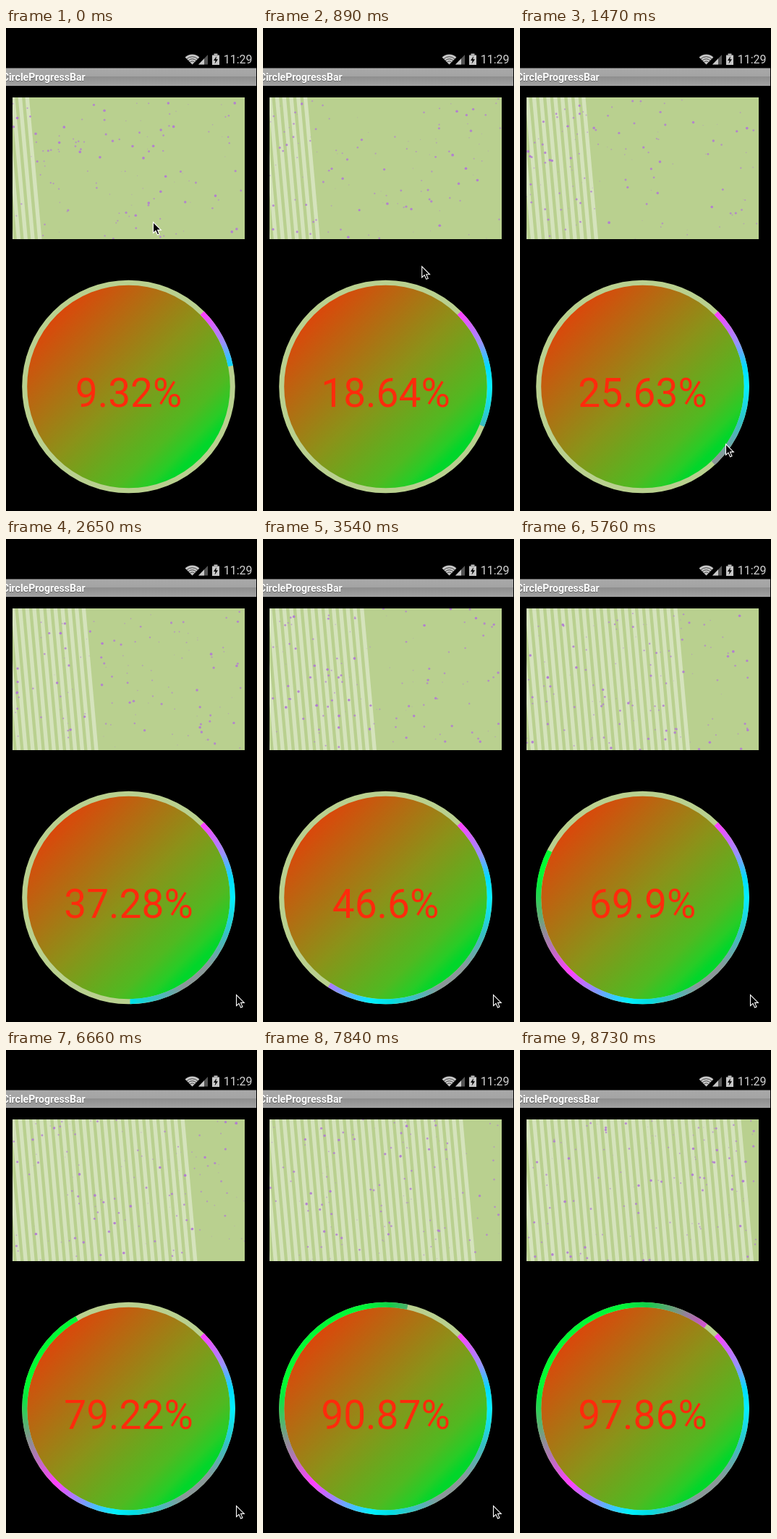
These frames come from a looping animation (347x668 px, 9.09 s). An HTML page with a canvas:

```html
<!DOCTYPE html>
<html lang="en">
<head>
<meta charset="utf-8">
<title>Circle progress</title>
<style>
  html, body { margin: 0; width: 100%; height: 100%; overflow: hidden; background: #000; }
  canvas { display: block; width: 347px; height: 668px; }
</style>
</head>
<body>
<canvas id="stage"></canvas>
<script>
const W = 347, H = 668, LOOP = 9090, TICK = 148.1;
const CX = 169.5, CY = 496, R = 147.3, RING = 7;
const PANEL = { x: 9, y: 96, w: 321, h: 196 };
const PALE = '#b9d08f';

// Ticks on which the progress value holds still.
const HOLDS = new Set([2, 5, 8, 11, 14, 17, 20, 22, 25, 28, 31, 34, 37, 40,
  43, 46, 48, 51, 54, 55, 57, 60, 61]);
const STRIPE_KEYS = [[4, 0], [11, 6], [16, 8], [23, 14], [30, 19], [39, 25], [42, 28]];
const POINTER_X = [[5, 203], [10, 284], [13, 318]];
const POINTER_Y = [[5, 268], [10, 575], [13, 630]];
const POINTER_END = 56;

const canvas = document.getElementById('stage');
const ctx = canvas.getContext('2d');
const scale = window.devicePixelRatio || 1;
canvas.width = W * scale;
canvas.height = H * scale;

function lerpKeys(keys, v) {
  if (v <= keys[0][0]) return keys[0][1];
  for (let i = 1; i < keys.length; i++) {
    const [a, va] = keys[i - 1], [b, vb] = keys[i];
    if (v <= b) return va + (vb - va) * (v - a) / (b - a);
  }
  return keys[keys.length - 1][1];
}

function random(seed) {
  let s = seed * 7919 + 17;
  return () => {
    s = (s + 0x6D2B79F5) | 0;
    let t = Math.imul(s ^ (s >>> 15), 1 | s);
    t = (t + Math.imul(t ^ (t >>> 7), 61 | t)) ^ t;
    return ((t ^ (t >>> 14)) >>> 0) / 4294967296;
  };
}

function poly(points) {
  ctx.beginPath();
  for (let i = 0; i < points.length; i += 2) ctx.lineTo(points[i], points[i + 1]);
  ctx.closePath();
}

function label(str, x, y, font, color, align) {
  ctx.font = font + ' Roboto, sans-serif';
  ctx.textAlign = align;
  ctx.fillStyle = color;
  ctx.fillText(str, x, y);
}

function withStops(gradient, stops) {
  for (const [at, color] of stops) gradient.addColorStop(at, color);
  return gradient;
}

const discFill = withStops(ctx.createLinearGradient(29, 355, 310, 637), [
  [0.12, '#e0420a'], [0.5, '#8b9219'], [0.72, '#50b921'], [0.79, '#28cc26'], [0.83, '#02d62a']
]);

const sweep = withStops(ctx.createConicGradient(0, CX, CY), [
  [0, '#00f0ff'], [20, '#35c0c4'], [42, '#8a9899'], [58, '#8a9899'],
  [88, '#00dfe6'], [98, '#00f0ff'], [134, '#ff40ff'], [162, '#8a8f92'],
  [186, '#08e840'], [195, '#00ff30'], [258, '#00f838'], [272, '#10d048'],
  [290, '#7c9486'], [302, '#b862b8'], [315, '#ff40ff'], [335, '#9a90ff'],
  [349, '#00dcff'], [360, '#00f0ff']
].map(([deg, color]) => [deg / 360, color]));

const barFill = withStops(ctx.createLinearGradient(0, 55, 0, 80), [
  [0, '#a9a9a9'], [0.48, '#a3a3a3'], [0.5, '#8f8f8f'], [1, '#a2a2a2']
]);

function drawStatusBar() {
  ctx.fillStyle = '#c8c8c8';
  ctx.beginPath();
  ctx.moveTo(257.5, 50.5);
  ctx.arc(257.5, 50.5, 14, -Math.PI * 0.75, -Math.PI * 0.25);
  ctx.fill();
  ctx.strokeStyle = '#222';
  ctx.lineWidth = 0.8;
  for (const r of [4.5, 7.7, 10.8]) {
    ctx.beginPath();
    ctx.arc(257.5, 50.5, r, -Math.PI * 0.75, -Math.PI * 0.25);
    ctx.stroke();
  }

  ctx.fillStyle = '#555';
  poly([266, 50.5, 279, 50.5, 279, 37]);
  ctx.fill();
  ctx.fillStyle = '#c8c8c8';
  poly([266, 50.5, 274, 50.5, 274, 42.2]);
  ctx.fill();

  ctx.fillRect(285, 37.5, 10, 13.5);
  ctx.fillRect(287.5, 35.5, 5, 2);
  ctx.fillStyle = '#000';
  poly([291, 39, 287, 45, 289.6, 45, 288.6, 49.5, 293, 43.3, 290.3, 43.3]);
  ctx.fill();

  label('11:29', 340.5, 49, '16px', '#d0d0d0', 'right');
}

function drawTitleBar() {
  ctx.fillStyle = barFill;
  ctx.fillRect(0, 55.5, 346, 24.5);
  label('CircleProgressBar', 109.5, 74, 'bold 14px', 'rgba(0,0,0,.35)', 'right');
  label('CircleProgressBar', 109.5, 73, 'bold 14px', '#fff', 'right');
}

function drawPanel(step) {
  const { x, y, w, h } = PANEL;
  ctx.save();
  ctx.beginPath();
  ctx.rect(x, y, w, h);
  ctx.clip();
  ctx.fillStyle = PALE;
  ctx.fillRect(x, y, w, h);

  ctx.fillStyle = 'rgba(255,255,255,.4)';
  const last = Math.round(lerpKeys(STRIPE_KEYS, step));
  for (let i = -4; i <= last; i++) {
    const right = 49.5 + i * 9.77, lean = 17.6, wide = 5.4;
    poly([right - lean - wide, y, right - lean, y, right, y + h, right - wide, y + h]);
    ctx.fill();
  }

  const rnd = random(step);
  for (let i = 0; i < 120; i++) {
    const size = rnd();
    ctx.fillStyle = `rgba(178,122,212,${0.4 + 0.55 * size})`;
    ctx.beginPath();
    ctx.arc(x + rnd() * w, y + rnd() * h, 0.5 + 1.35 * size, 0, Math.PI * 2);
    ctx.fill();
  }
  ctx.restore();
}

function drawDial(percent) {
  const mid = R - RING / 2, start = -Math.PI / 4;
  ctx.fillStyle = discFill;
  ctx.beginPath();
  ctx.arc(CX, CY, mid, 0, Math.PI * 2);
  ctx.fill();
  ctx.lineWidth = RING;
  ctx.strokeStyle = PALE;
  ctx.stroke();

  ctx.strokeStyle = sweep;
  ctx.beginPath();
  ctx.arc(CX, CY, mid, start, start + percent / 100 * Math.PI * 2);
  ctx.stroke();

  label(percent + '%', CX, 524, '55px', '#ff2a0c', 'center');
}

function drawPointer(tick) {
  if (tick >= POINTER_END) return;
  ctx.save();
  ctx.translate(lerpKeys(POINTER_X, tick), lerpKeys(POINTER_Y, tick));
  poly([0.5, 0.5, 0.5, 15.5, 4, 12.3, 6.6, 18, 9, 17, 6.6, 11.4, 11.3, 11.4]);
  ctx.fillStyle = '#000';
  ctx.fill();
  ctx.strokeStyle = '#fff';
  ctx.lineWidth = 1.1;
  ctx.stroke();
  ctx.restore();
}

function draw(ms) {
  const tick = Math.floor((ms % LOOP + 16) / TICK);
  let step = 4;
  for (let i = 1; i <= tick; i++) if (!HOLDS.has(i)) step++;

  ctx.setTransform(scale, 0, 0, scale, 0, 0);
  ctx.fillStyle = '#000';
  ctx.fillRect(0, 0, W, H);
  drawStatusBar();
  drawTitleBar();
  drawPanel(step);
  drawDial(parseFloat((step * 2.33).toFixed(2)));
  drawPointer(tick);
}

const began = performance.now();
function loop() {
  draw(performance.now() - began);
  requestAnimationFrame(loop);
}
loop();
</script>
</body>
</html>
```
